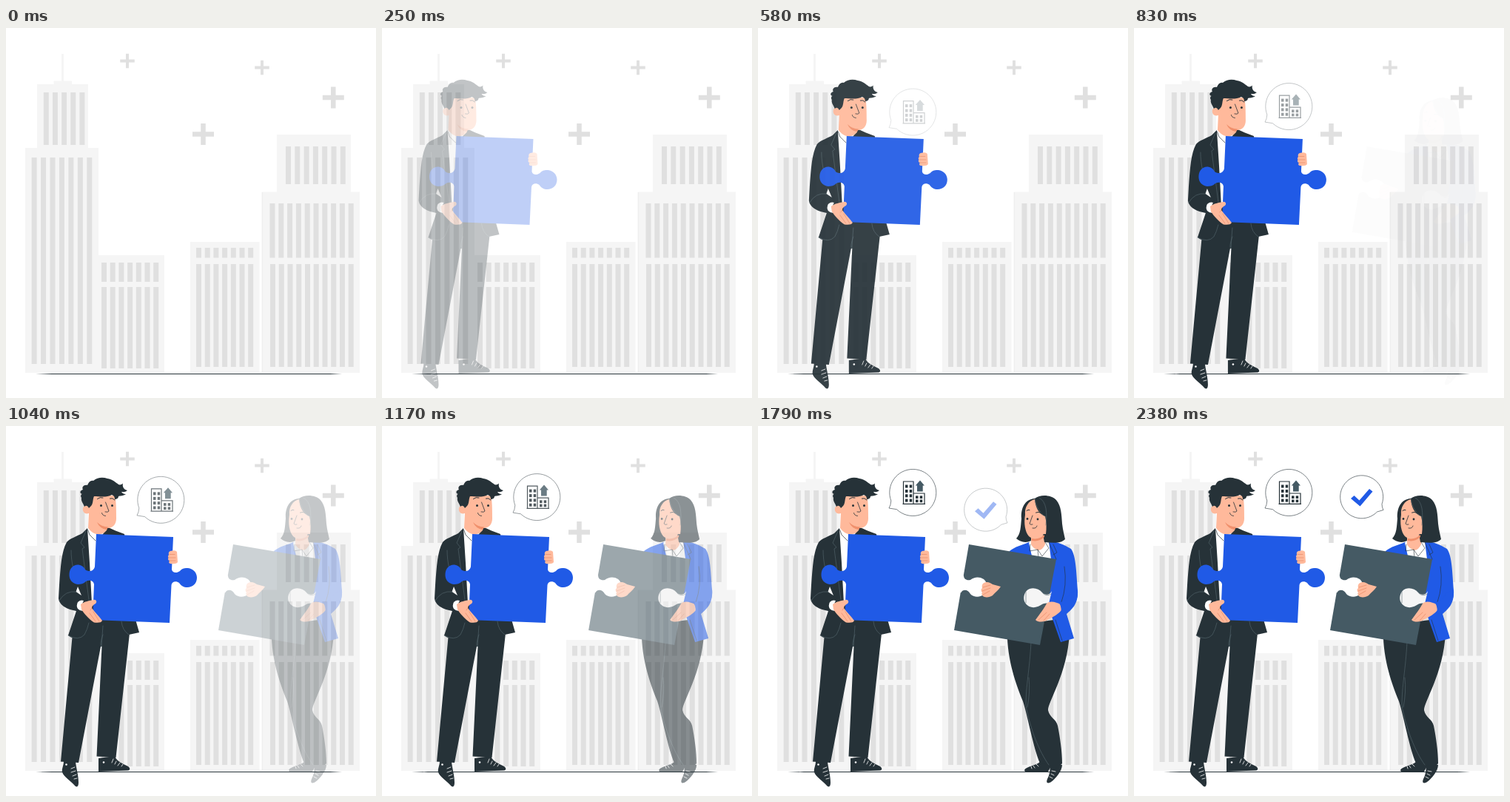
An HTML page that plays this animation: 500x500 px, repeating every 2.43 s.

```html
<!DOCTYPE html>
<html lang="en">
<head>
<meta charset="utf-8">
<title>Puzzle partners</title>
<style>
  html, body { margin: 0; width: 100%; height: 100%; overflow: hidden; background: #fff; }
  svg { display: block; width: 100vw; height: 100vh; }
  .wall { fill: #f5f5f5; }
  .pane { fill: #e0e0e0; }
  .dark { fill: #263238; }
  .slate { fill: #455a64; }
  .blue { fill: #205ae6; }
  .skin { fill: #ffb99b; }
  .shade { fill: #f0906c; }
  .white { fill: #fff; }
  .ink, .seam, .lace, .crease { fill: none; stroke-linecap: round; stroke-linejoin: round; }
  .ink { stroke: #263238; stroke-width: 1; }
  .seam { stroke: #566970; stroke-width: .6; }
  .lace { stroke: #fff; stroke-width: .8; }
  .crease { stroke: #e58a68; stroke-width: .7; }
  .bubble { fill: #fff; stroke: #263238; stroke-width: .6; stroke-linejoin: round; }
</style>
</head>
<body>
<svg viewBox="0 0 500 500">
  <g id="city"></g>
  <path class="dark" d="M40 467.5L62 467.1H438L454 467.5L438 468H62Z"/>

  <g id="man">
    <!-- shoes -->
    <path class="dark" d="M78 453L94 454C95 463 98 472 98 482C98 487 96 489 93 486C88 480 78 474 76 468C75 463 78 459 78 453Z"/>
    <path class="dark" d="M125 449L147 446C149 453 159 457 165 460C168 462 168 465 165 465.5L125 467Z"/>
    <path class="lace" d="M88 463L93 461M88 468L94 466M90 473L95 471M92 477L96 476M143 455L145 450M147 457L149 453M151 459L154 455M156 460L158 457"/>
    <circle class="white" cx="81.500" cy="457.500" r="1.300"/>
    <circle class="white" cx="132" cy="454.500" r="1.300"/>
    <!-- trousers -->
    <path class="dark" d="M90 280L74 453.500L98 455L128 298H129.500L122.500 446.500L148.500 448L169 262H100Z"/>
    <path class="seam" d="M129 298L131 270M131 282Q126 296 129 298"/>
    <!-- jacket -->
    <path class="dark" d="M110 138L103 145C96 149 86 152 82 157C75 170 74 188 72 215L71 233C72 243 84 248 95 250L84 283C90 288 97 288 104 287C110 282 112 272 114 262L156 262C156 272 159 280 166 282L180 279L174 258L160 146C152 143 144 140 136 136L124 146Z"/>
    <path class="wall" d="M97 217L94.500 224L102 229Z"/>
    <path class="white" d="M110 138L113 185L116 240L122 240L128 150L137 138L113 132Z"/>
    <path class="ink" style="stroke-width:.7" d="M110.500 140L113 147L121 155M137 138L133 147"/>
    <path class="seam" d="M108 142L101 158L106 164L103 166L112 235M88 168C88 185 92 199 97 213M72 236Q80 222 95 224M84 283Q98 291 106 282Q110 275 112 266M156 264Q157 276 166 282"/>
    <!-- head -->
    <path class="skin" d="M112 94H147.500C149 104 149 117 149 125C149 132 145 138 137 138L136 141C132 146 126 147 122 146C118 145 114 142 111 138L112 118C106 120 103 115 104 111C105 107 109 107 112 109Z"/>
    <path class="shade" d="M123 130Q129 136 138 136.500L136 140Q127 139 123 130Z"/>
    <path class="dark" d="M106 109C104 104 101 101 102 97C100 94 102 92 103 92C99 91 100 87 104 86C102 83 105 79 110 80C112 75 115 73 118 74C124 69 131 69 137 71C144 72 148 76 152 79C154 80 157 79 158 77.500C157 82 159 86 164 87C161 90 158 89 156 89C158 92 161 92 162 92C158 95 154 94 152 95C152 98 149 99 147 99C147 96 146 94 143 93C136 97 126 95 119 95C117 99 118 105 115 108L112 111C110 107 108 107 106 109Z"/>
    <path class="ink" d="M123.500 98.500Q127 95.500 131 97M140.500 98Q144 96.500 147 100" stroke-width="1.400"/>
    <path class="ink" style="stroke-width:.8" d="M134.500 103L139 115Q138 117 134 116M129.500 117.500Q130 121 134.500 121.500"/>
    <circle class="dark" cx="128.500" cy="107.500" r="1.500"/>
    <circle class="dark" cx="143.500" cy="107.500" r="1.500"/>
    <!-- puzzle piece -->
    <path class="blue" d="M122 146L226 150L224 194C225 199 231 199 235 196C238 192 242 192 246 192C253 193 258 198 258 205C258 213 252 218 245 218C240 218 237 216 234 212C230 209 224 210 223.500 215L221 266L117 262L119 214C118 208 112 208 108 210C105 213 101 214 97 214C90 213 85 208 85.500 200C86 192 91 187 98 187.500C102 188 105 190 107 194C112 198 119 196 120 190Z"/>
    <!-- hands -->
    <path class="white" d="M97 238Q101 234.500 105 236Q101 242 106 249Q101 251 97 247Q94.500 243 97 238Z"/>
    <path class="skin" d="M101 241C106 237 113 236 118 235C122 234 123.500 238 121 240C118 242 116 243 116 246C120 252 126 257 130 263C129 266 124 266 119 265.500C112 261 106 254 102 248Z"/>
    <path class="crease" d="M116 246L114 249M113 253L121 264M118 251L126 264"/>
    <path class="skin" d="M222 169Q229 167 231 170L232 184Q230 187 222 186Q219 185 221 182Q218 181 219.500 178Q218 176 220 174Q219 170 222 169Z"/>
    <path class="crease" d="M221 173.500H228M220 178H229M221 182H229"/>
  </g>

  <g id="plan">
    <path class="bubble" d="M179.800 101A31.500 31.500 0 1 1 187.500 112.700L177 111Q179.500 107 179.800 101Z"/>
    <path class="ink" style="stroke-width:1.200;stroke-linecap:butt;stroke-linejoin:miter" d="M195.500 105.300H226M196.500 105V75H210V105M210.500 91H225V105"/>
    <g id="panes"></g>
    <path class="slate" d="M219 73.500L225 80.500H222.700V88.500H215V80.500H212.800Z"/>
  </g>

  <g id="woman">
    <!-- shoes -->
    <path class="dark" d="M381 454C375 459 362 460 360 465Q360 467.500 364 467.500L392 467L398 456Z"/>
    <path class="dark" d="M394 456L411 458C411 466 402 477 396 481C391 484 389 482 391 477C395 470 395 462 394 456Z"/>
    <path class="lace" d="M372 459L374 462M376 457L379 460M369 460L370 463M397 466L402 467M396 470L400 472M394 474L398 476"/>
    <!-- trousers -->
    <path class="dark" d="M337 270C335 310 347 345 358 372C365 394 372 435 381 455.500L393 458L407 460L411 456C411 440 408 420 405 405C403 396 394 394 392 384C392 372 418 335 421 280L400 262Z"/>
    <path class="seam" d="M369 292C367 330 362 350 362 378C368 410 380 440 393 458M364 380Q368 360 366 340"/>
    <!-- jacket -->
    <path class="blue" d="M337 174L340 169C347 163 357 161 366 157L380 172L393 155C403 156 415 161 423 166C430 176 430 198 432 222C433 240 425 247 417 254L427 287L409 292L396 255L362 240Z"/>
    <path class="white" d="M366 158L371 180H396L393 156Z"/>
    <path class="skin" d="M369 146L388 142V160Q385 167 379 168Q371 165 369 160Z"/>
    <path class="ink" style="stroke-width:.6" d="M368 160L367 169L378 167L384 176L393 165L388 157M378 167L379 178M393 157L403 180M399 160L404 171L399 174M402 262L411 290M414 190Q418 215 410 238"/>
    <!-- head -->
    <path class="dark" d="M374 98C382 92 396 93 403 100C410 108 410 120 411 132C412 141 414 148 415 153C409 159 399 158 387 157L384 140L369 150L369 155C361 159 354 156 349 152C355 146 355 136 356 125C355 112 360 99 374 98Z"/>
    <path class="skin" d="M374 99C366 101 360 109 361 120C359 132 361 143 366 149C371 154 379 153 386 146L389 146C390 138 390 130 388 122C380 119 375 111 374 99Z"/>
    <path class="shade" d="M370 152Q380 154 387 147L387 150Q380 157 370 155Z"/>
    <path class="seam" d="M374 98C376 110 381 118 389 123M380 97C390 102 391 117 389 134"/>
    <path class="ink" d="M363 114.500Q365 112.500 367 113.500M375.500 117Q379 115 383 118"/>
    <path class="ink" style="stroke-width:.8" d="M371 121L367 132Q368 134 371 133M371 138Q376 139 377 135"/>
    <circle class="dark" cx="364" cy="125.500" r="1.400"/>
    <circle class="dark" cx="378" cy="126" r="1.400"/>
    <!-- puzzle piece -->
    <path class="slate" d="M285 160L403 180L381 296L265 276Z"/>
    <path class="white" d="M274 203L278 202C278 207 282 209 287 208C292 204 299 203 305 207C311 212 311 222 306 227C300 232 292 232 287 227C284 221 277 220 274.500 225L272 225Z"/>
    <path class="wall" d="M397 223C394 229 388 229 384 225C380 220 373 218 367 220C360 223 358 231 360 237C363 244 371 247 378 244C383 242 386 238 393 240Z"/>
    <path class="seam" d="M362 224V239M385 226Q390 231 396 227"/>
    <!-- hands -->
    <path class="skin" d="M304 213C309 209 314 212 317 214L328 217C325 222 320 225 317 229C313 232 306 232 304 230Q301 227 303 225Q300 221 303 219Q302 215 304 213Z"/>
    <path class="crease" d="M304 218L314 215M303 223L314 219M304 228L313 223"/>
    <path class="skin" d="M375 262C381 254 387 246 390 240C395 235 404 239 409 241L411 248C406 254 399 258 393 261C388 265 379 266 375 262Z"/>
    <path class="crease" d="M379 262L390 252M386 263L394 254"/>
    <path class="blue" d="M407 239Q419 235 422 225L432 222C433 239 424 248 409 255Q411 246 407 239Z"/>
  </g>

  <g id="done">
    <path class="bubble" d="M335 105.500A29 29 0 1 0 328.500 116L337 113.500Q335 110 335 105.500Z"/>
    <path class="blue" d="M293 98L297.500 94L304.500 100.500L318 85L322.500 88.500L305.500 108.500Z"/>
  </g>
</svg>
<script>
const $ = id => document.getElementById(id);
const LOOP = 2430, FPS = 24, SHIFT = 30;

const box = (cls, x, y, w, h) =>
  `<rect class="${cls}" x="${x}" y="${y}" width="${w}" height="${h}"/>`;

const row = (cls, n, x, pitch, y, w, h) =>
  Array.from({ length: n }, (_, i) => box(cls, x + i * pitch, y, w, h)).join('');

const plus = (x, y, size, bar) =>
  box('pane', x - size / 2, y - bar / 2, size, bar) +
  box('pane', x - bar / 2, y - size / 2, bar, size);

$('city').innerHTML = [
  box('wall', 75, 35, 3, 38), box('wall', 64.5, 71.5, 24.5, 5),
  box('wall', 42, 76, 69, 87), box('wall', 26, 162, 99, 304),
  row('pane', 5, 50.8, 12.15, 87, 7, 71),
  row('pane', 7, 34.6, 12.45, 175, 7, 279),
  box('wall', 125, 307, 89, 159),
  row('pane', 7, 129, 11.7, 317, 7, 26),
  row('pane', 7, 129, 11.7, 350, 7, 110),
  box('wall', 249, 289, 93.5, 177),
  row('pane', 7, 257, 11.7, 297, 7, 13.5),
  row('pane', 7, 257, 11.7, 319, 7, 139),
  box('wall', 366, 144, 100, 78), box('wall', 346, 221.5, 132, 244.5),
  box('pane', 345.8, 222, 0.5, 244),
  row('pane', 7, 378, 12.3, 160, 7, 51),
  row('pane', 10, 356.5, 11.8, 237, 7, 73.5),
  row('pane', 10, 357, 11.75, 319, 7, 139),
  plus(164, 44.5, 19.5, 4), plus(346, 53.5, 19.5, 4),
  plus(266.5, 143.5, 29, 6.5), plus(442.3, 94, 29, 6.5)
].join('');

$('panes').innerHTML =
  [79.5, 86, 92.3, 98.6].map(y => row('dark', 2, 199, 5.7, y, 3.5, 4)).join('') +
  [94.3, 99.5].map(y => row('dark', 2, 213, 5.7, y, 3.5, 3.7)).join('');

const bezier = (x1, y1, x2, y2) => x => {
  const at = (a, b, s) => 3 * (1 - s) ** 2 * s * a + 3 * (1 - s) * s * s * b + s ** 3;
  let lo = 0, hi = 1;
  for (let i = 0; i < 24; i++) {
    const mid = (lo + hi) / 2;
    if (at(x1, x2, mid) < x) lo = mid; else hi = mid;
  }
  return at(y1, y2, lo);
};

const clamp = v => Math.min(1, Math.max(0, v));
const back = bezier(.36, -.01, .5, 1.38);
const linear = x => x;

// Each part enters over one second, fading in as it travels home.
const parts = [
  { el: $('man'), delay: 0, dx: -30, dy: 0, ease: back },
  { el: $('plan'), delay: 400, dx: 0, dy: 30, ease: linear },
  { el: $('woman'), delay: 800, dx: 30, dy: 0, ease: back },
  { el: $('done'), delay: 1400, dx: 0, dy: 30, ease: linear }
];

function draw(ms) {
  const step = Math.floor((ms % LOOP + 5) * FPS / 1000);
  const t = step < 2 ? -SHIFT : step * 1000 / FPS;
  for (const { el, delay, dx, dy, ease } of parts) {
    const x = clamp((t + SHIFT - delay) / 1000);
    const p = x === 0 || x === 1 ? x : ease(x);
    el.setAttribute('opacity', clamp(p));
    el.setAttribute('transform', `translate(${dx * (1 - p)} ${dy * (1 - p)})`);
  }
}

const start = performance.now();
function tick() {
  draw(performance.now() - start);
  requestAnimationFrame(tick);
}
tick();
</script>
</body>
</html>
```
